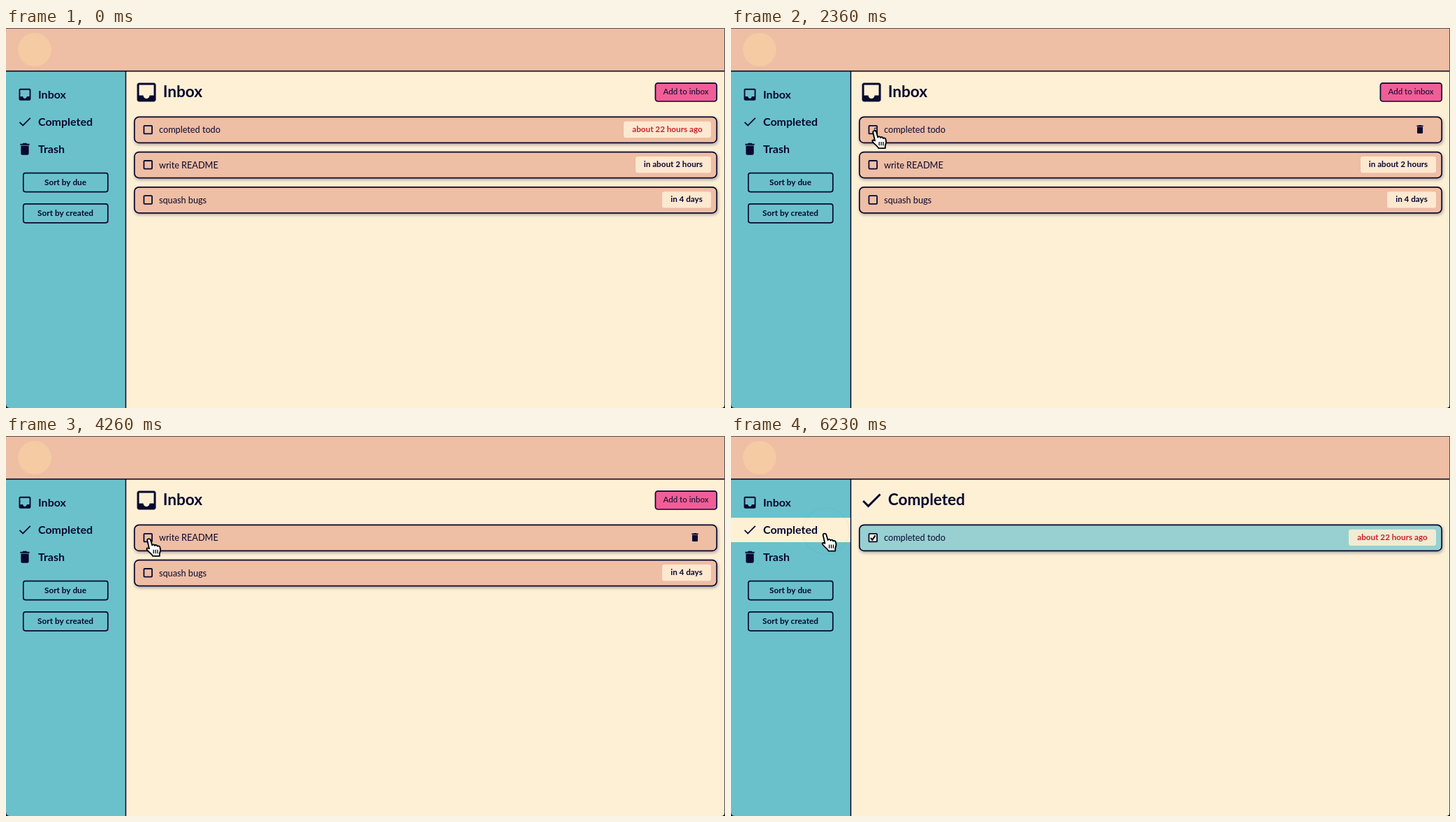
An HTML page with a canvas for the animation above (7.53 s loop, 1029 by 544 pixels).

```html
<!DOCTYPE html>
<html lang="en">
<head>
<meta charset="utf-8">
<title>Todo inbox</title>
<style>
html, body { margin: 0; width: 100%; height: 100%; overflow: hidden; background: #fdf0d5; }
canvas { display: block; width: 1029px; height: 544px; }
</style>
</head>
<body>
<canvas id="stage"></canvas>
<script>
const W = 1029, H = 544, LOOP = 7530, BAR = 10;
const INK = '#08082f', PEACH = '#eebea5', CREAM = '#fdf0d5', TEAL = '#6ac1cc';
const PINK = '#f05e95', RED = '#cb2229', BADGE = '#fde8d0';
const FONT = 'Lato, "Open Sans", sans-serif';

// Event times in ms
const HOVER = 1190, CLICK = 2325, CHECK = 2450, SLIDE = 2480, GONE = 3145;
const LEAVE = 4230, CLICK2 = 5325, PAGE = 5480;

const ICON = {
  inbox: new Path2D('M19 3H5c-1.1 0-2 .9-2 2v14c0 1.1.9 2 2 2h14c1.1 0 2-.9 2-2V5c0-1.1-.9-2-2-2zm0 12h-4c0 1.66-1.35 3-3 3s-3-1.34-3-3H5V5h14v10z'),
  done: new Path2D('M9 16.2L4.8 12l-1.4 1.4L9 19 21 7l-1.4-1.4L9 16.2z'),
  trash: new Path2D('M6 19c0 1.1.9 2 2 2h8c1.1 0 2-.9 2-2V7H6v12zM19 4h-3.5l-1-1h-5l-1 1H5v2h14V4z')
};
const ARROW = new Path2D('M0 0V21.5L4.8 17L8.7 25.6L12.2 24.1L8.5 15.6H15.2Z');
const HAND = new Path2D('M2 3C2 .5 6 .5 6.5 3L8.5 10C9 8.5 11.5 8.5 12 10.5C12.8 9 15 9.3 15.4 11.3C16.5 10.3 18.7 11 19 13C20 16 19.5 18 18.3 21V24.6H9.3C8.5 22 5 20 2.5 17C0 14.2 1.5 12.8 4.6 14.4Z');
const FINGERS = new Path2D('M10.3 16V21M13 16V21M15.7 16V21');

const canvas = document.getElementById('stage');
const ctx = canvas.getContext('2d');
const dpr = window.devicePixelRatio || 1;
canvas.width = W * dpr;
canvas.height = H * dpr;

function rect(x, y, w, h, color) {
  ctx.fillStyle = color;
  ctx.fillRect(x, y, w, h);
}

function box(x, y, w, h, r, fill, line) {
  ctx.beginPath();
  ctx.roundRect(x, y, w, h, r);
  if (fill) { ctx.fillStyle = fill; ctx.fill(); }
  if (line) { ctx.strokeStyle = INK; ctx.lineWidth = line; ctx.stroke(); }
}

function text(str, x, y, size, weight = 400, color = INK, align = 'left') {
  ctx.font = `${weight} ${size}px ${FONT}`;
  ctx.textAlign = align;
  ctx.fillStyle = color;
  ctx.fillText(str, x, y);
}

function icon(name, x, y, scale) {
  ctx.save();
  ctx.translate(x, y);
  ctx.scale(scale, scale);
  ctx.fillStyle = INK;
  ctx.fill(ICON[name]);
  ctx.restore();
}

function navItem(name, label, y, active) {
  if (active) rect(0, y - 17, 170.6, 35, CREAM);
  icon(name, 15.7, y - 11, 0.94);
  text(label, 46, y + 5.5, 16, 700);
}

function row(x, y, right, item, hover) {
  const done = item.page;
  ctx.save();
  ctx.shadowColor = 'rgba(20,20,80,.35)';
  ctx.shadowBlur = 4 * dpr;
  ctx.shadowOffsetX = dpr;
  ctx.shadowOffsetY = 2 * dpr;
  box(x, y, right - x, 38.6, 7, done ? '#98d0d2' : PEACH);
  ctx.restore();
  box(x + .8, y + .8, right - x - 1.6, 37, 6.5, null, 1.7);

  box(x + 14.4, y + 13.2, 11.6, 11.6, 1, item.checked ? CREAM : null, 1.8);
  if (item.checked) {
    ctx.beginPath();
    ctx.moveTo(x + 17, y + 19.4);
    ctx.lineTo(x + 19.3, y + 22);
    ctx.lineTo(x + 23.6, y + 15.8);
    ctx.lineWidth = 2.1;
    ctx.stroke();
  }
  text(item.label, x + 36, y + 23.8, 12.7);

  if (hover) {
    icon('trash', right - 40, y + 10.3, 0.67);
  } else {
    const w = item.w, bx = right - 9 - w;
    box(bx, y + 7.2, w, 23.2, 3, done ? '#f1ebd3' : BADGE);
    text(item.due, bx + w / 2, y + 22.4, 11.7, 700, item.late ? RED : INK, 'center');
  }
}

function scrollbars(total) {
  rect(W - BAR, 0, BAR, H, '#fafafa');
  rect(0, H - BAR - .5, W, BAR + .5, '#fafafa');
  rect(W - BAR, 0, .6, H - BAR, '#dedede');
  rect(0, H - BAR - .5, W - BAR, .6, '#dedede');
  box(W - 7.8, 1, 6, 520, 3, '#8d8d8d');
  const view = W - BAR;
  box(2, H - 8, (view - 4) * view / total, 6, 3, '#8d8d8d');
}

function frame() {
  ctx.strokeStyle = '#39353a';
  rect(0, 0, W, 1, '#5b4f50');
  rect(W - 1, 0, 1, H, '#55504f');
  ctx.fillStyle = '#0a0a16';
  for (const [x, s] of [[0, 1], [W, -1]]) {
    ctx.beginPath();
    ctx.moveTo(x, H);
    ctx.lineTo(x, H - 6);
    ctx.quadraticCurveTo(x, H, x + 6 * s, H);
    ctx.fill();
  }
}

const lerp = (a, b, u) => a + (b - a) * u;
const ease = u => u * u * (3 - 2 * u);

// Pointer stops: time, x, y
const STOPS = [[290, 478, -26], [1030, 280, 98], [1200, 242, 125], [1400, 207, 147],
  [LEAVE, 207, 147], [4660, 135.5, 139.5], [LOOP, 135.5, 139.5]];

function pointer(t) {
  if (t < 300) return null;
  const i = STOPS.findIndex(s => s[0] > t);
  const a = STOPS[i - 1], b = STOPS[i];
  let u = (t - a[0]) / (b[0] - a[0]);
  if (b[0] === 1400) u = u * (2 - u);
  if (b[0] === 4660) u = ease(u);
  return { x: lerp(a[1], b[1], u), y: lerp(a[2], b[2], u) };
}

function ring(x, y, age) {
  const a = Math.min(age, 855);
  ctx.globalAlpha = 0.85 * (1 - Math.pow(a / 870, 2.3));
  ctx.beginPath();
  ctx.arc(x, y, 35.5 * Math.sin(a * 0.00142), 0, Math.PI * 2);
  ctx.strokeStyle = '#34343c';
  ctx.lineWidth = 1.4;
  ctx.stroke();
  ctx.globalAlpha = 1;
}

function cursor(p, hand) {
  ctx.save();
  ctx.lineJoin = 'round';
  if (hand) {
    ctx.translate(p.x - 6, p.y - 1);
    ctx.scale(1.08, 1.06);
    ctx.strokeStyle = '#000';
    ctx.fillStyle = '#fff';
    ctx.lineWidth = 1.7;
    ctx.fill(HAND);
    ctx.stroke(HAND);
    ctx.lineWidth = 1.2;
    ctx.stroke(FINGERS);
  } else {
    ctx.translate(p.x, p.y);
    ctx.strokeStyle = '#fff';
    ctx.lineWidth = 2.4;
    ctx.stroke(ARROW);
    ctx.fillStyle = '#000';
    ctx.fill(ARROW);
  }
  ctx.restore();
}

const slideAt = t => t < SLIDE ? 0 : 350 * Math.pow((t - SLIDE) / 520, 2.2);

function draw(t) {
  const moving = t > SLIDE && t < GONE;
  const slide = moving ? slideAt(t) : 0;
  const bars = slide > 12;
  const right = W - 11 - (bars ? 10.6 : 0);
  const side = bars ? 168.9 : 170.6;
  const left = side + 12.4;
  const onPage = t >= PAGE;
  const p = pointer(t);
  const onNav = t > LEAVE && p.x < 171;
  const onFirst = t >= HOVER && slide < 24 && p.x > 183;

  ctx.setTransform(dpr, 0, 0, dpr, 0, 0);
  ctx.textBaseline = 'alphabetic';
  rect(0, 0, W, H, CREAM);
  rect(0, 0, W, 61, PEACH);
  rect(0, 61, side, H - 61, TEAL);
  rect(0, 60.9, W, 1.6, INK);
  rect(side, 61, 1.6, H - 61, INK);
  ctx.beginPath();
  ctx.arc(41, 31, 24, 0, Math.PI * 2);
  ctx.fillStyle = '#f4cba3';
  ctx.fill();

  navItem('inbox', 'Inbox', 95, false);
  navItem('done', 'Completed', 134, onNav);
  navItem('trash', 'Trash', 173, false);
  [['Sort by due', 207], ['Sort by created', 251.2]].forEach(([label, y]) => {
    const w = side - 49;
    box(24.8, y + .6, w - .6, 27, 3, null, 1.7);
    text(label, side / 2 - .3, y + 17.6, 11.8, 700, INK, 'center');
  });

  icon(onPage ? 'done' : 'inbox', left, 74, 1.5);
  text(onPage ? 'Completed' : 'Inbox', left + 41.7, 99, 22.6, 700);
  if (!onPage) {
    box(right - 88.6, 78.8, 87.8, 26.2, 3.5, PINK, 1.7);
    text('Add to inbox', right - 45, 95.4, 11.6, 400, INK, 'center');
  }

  const todo = {
    label: 'completed todo', due: 'about 22 hours ago', w: 125, late: true,
    checked: t >= CHECK, page: onPage
  };
  const readme = { label: 'write README', due: 'in about 2 hours', w: 108 };
  const bugs = { label: 'squash bugs', due: 'in 4 days', w: 70 };
  const list = onPage ? [todo] : t < GONE ? [todo, readme, bugs] : [readme, bugs];
  list.forEach((item, i) => {
    const dx = item === todo ? slide : 0;
    row(left + dx, 126.6 + i * 50.2, right + dx, item, i === 0 && onFirst && !onNav);
  });

  if (bars) scrollbars(right + slideAt(Math.max(SLIDE, t - 33)));
  frame();

  if (t >= CLICK && t < LEAVE) ring(207, 145, t - CLICK);
  if (t >= CLICK2) ring(135.7, 136.3, t - CLICK2);
  if (p) cursor(p, onNav || onFirst);
}

let start;
function tick(now) {
  if (start === undefined) start = now;
  draw(Math.max(0, now - start) % LOOP);
  requestAnimationFrame(tick);
}
draw(0);
requestAnimationFrame(tick);
</script>
</body>
</html>
```
